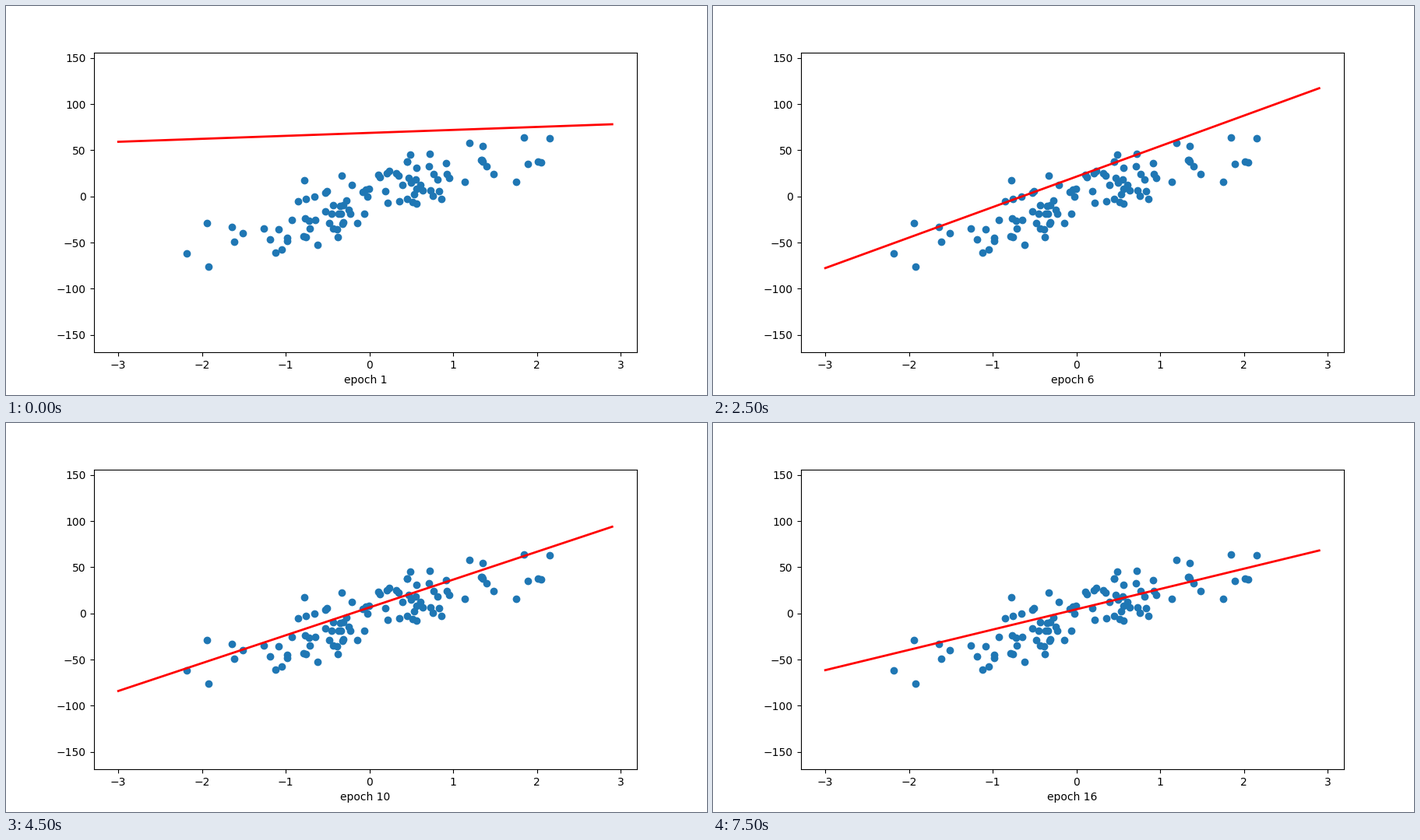
Write a matplotlib script that moves like this. It is 900 px wide and 500 px high and loops after 8 s.

```python
import numpy as np
import matplotlib.pyplot as plt
from matplotlib.animation import FuncAnimation

# noisy linear data
rng = np.random.RandomState(13)
X = rng.standard_normal(100)
slope = 100 * rng.uniform()
y = slope * X + rng.normal(scale=20, size=100)

# x of the sample visited at each step
VISITS = [-1.61, -1.95, -1.26, 1.34, -0.66, -0.225, 1.4, -0.64,
          1.34, -1.61, -0.027, 0.22, 2.06, -0.225, -0.85, 0.487]


def learning_rate(t):
    return 5 / (t + 50)


def descend(m=-127.82, b=150.0):
    """Stochastic gradient descent on the squared error, one sample per step."""
    for t, x in enumerate(VISITS):
        j = np.argmin(abs(X - x))
        step = 2 * learning_rate(t) * (m * X[j] + b - y[j])
        m, b = m - step * X[j], b - step
        yield m, b


path = list(descend())

fig, ax = plt.subplots(figsize=(9, 5), dpi=100)
xs = np.linspace(-3, 2.9, 60)
ax.scatter(X, y)
line, = ax.plot(xs, 50 * xs - 4, "r-", linewidth=2)
ax.set_xlim(ax.get_xlim())
ax.set_ylim(ax.get_ylim())


def update(i):
    m, b = path[i]
    line.set_ydata(m * xs + b)
    ax.set_xlabel(f"epoch {i + 1}")
    return line,


anim = FuncAnimation(fig, update, frames=len(path), interval=500, repeat=True)
plt.show()
```
